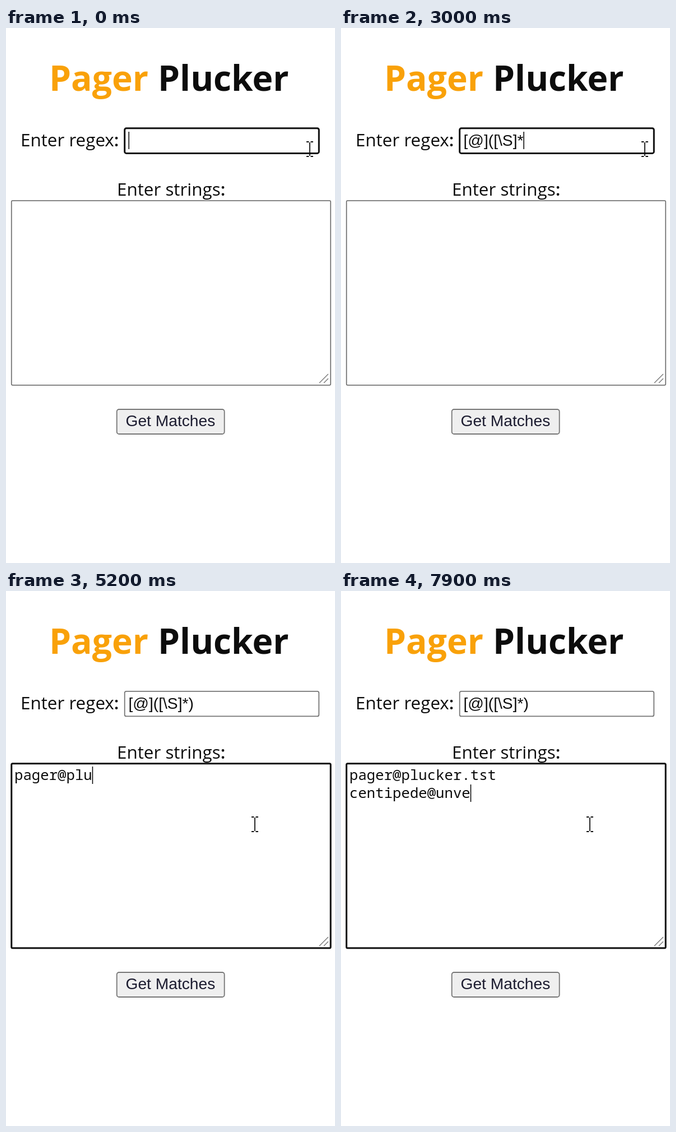
Recreate the animation shown at these times as an HTML page. Size 587x954 px, loop 8 s.

```html
<!DOCTYPE html>
<html lang="en">
<head>
<meta charset="utf-8">
<title>Pattern tester</title>
<style>
  html, body { margin: 0; width: 100%; height: 100%; overflow: hidden; background: #fff; }
  svg { display: block; width: 100%; height: 100%; }
  text { fill: #0c0c0c; }
  .title { font: 700 62.3px "Open Sans", sans-serif; }
  .title .accent { fill: #f9a109; }
  .label { font: 400 31.4px "Open Sans", sans-serif; }
  .label tspan { font-weight: 600; }
  .ui { font: 28.2px "Liberation Sans", Arial, sans-serif; }
  .button { fill: #1c1c30; }
  .mono { font: 25.7px "Noto Sans Mono", monospace; }
  .box { fill: #fff; stroke: #767676; stroke-width: 1.8; }
  .box.focus { stroke: #101010; stroke-width: 3; }
</style>
</head>
<body>
<svg viewBox="0 0 587 954">
  <g class="title">
    <text class="accent" x="77" y="112">Pager</text>
    <text x="271" y="112">Plucker</text>
  </g>
  <g class="label">
    <text x="26" y="211">Enter regex<tspan>:</tspan></text>
    <text x="198" y="299">Enter strings<tspan>:</tspan></text>
  </g>
  <rect id="field" class="box" x="211.7" y="178.8" width="346.6" height="44.6" rx="3"/>
  <rect id="area" class="box" x="9.8" y="307.8" width="569.4" height="329" rx="2"/>
  <path d="M559 633 575 617M567 633 575 625" stroke="#777" stroke-width="1.4"/>
  <rect x="197.7" y="680" width="192" height="44" rx="4" fill="#efefef" stroke="#767676" stroke-width="1.8"/>
  <text class="ui button" x="213.5" y="709.5">Get Matches</text>
  <text id="pattern" class="ui" x="218.5" y="210"/>
  <text id="line1" class="mono" x="15" y="337"/>
  <text id="line2" class="mono" x="15" y="369"/>
  <rect id="caret" width="1.5" height="31"/>
  <path id="mouse" fill="none" stroke="#111" stroke-width="1.8"
    d="M-6-13H-1.5M1.5-13H6M0-12V12M-6 13H-1.5M1.5 13H6"/>
</svg>
<script>
const LOOP = 8000, STEP = 100, BLINK = 500;
const $ = id => document.getElementById(id);

// Text is typed in bursts with an even gap between keys
const burst = (text, from, gap) => ({ text, from, gap });
const rows = [
  { id: "pattern", start: 0, caretTop: 185,
    bursts: [burst("[@]([\\S", 400, 250), burst("]*)", 2650, 250)] },
  { id: "line1", start: 3800, caretTop: 313,
    bursts: [burst("pager", 3950, 100), burst("@plucker.tst", 4800, 108)] },
  { id: "line2", start: 6250, caretTop: 345,
    bursts: [burst("centipede", 6450, 90), burst("@unve", 7400, 110)] }
];

function typed(row, t) {
  let text = "", last = row.start;
  for (const b of row.bursts) {
    if (t < b.from) break;
    const n = Math.min(b.text.length, Math.floor((t - b.from) / b.gap) + 1);
    text += b.text.slice(0, n);
    last = b.from + (n - 1) * b.gap;
  }
  return { text, last };
}

function ease(t, from, to) {
  const u = Math.min(1, Math.max(0, (t - from) / (to - from)));
  return u * u * (3 - 2 * u);
}

function drawCaret(row, t, last) {
  const el = $(row.id), caret = $("caret");
  const width = el.textContent ? el.getComputedTextLength() : 0;
  caret.setAttribute("x", el.x.baseVal[0].value + width);
  caret.setAttribute("y", row.caretTop);
  caret.style.opacity = (t - last) % (2 * BLINK) < BLINK ? 1 : 0;
}

function draw(t) {
  for (const row of rows) {
    const { text, last } = typed(row, t);
    $(row.id).textContent = text;
    if (t >= row.start) drawCaret(row, t, last);
  }
  const inArea = t >= rows[1].start;
  $("field").classList.toggle("focus", !inArea);
  $("area").classList.toggle("focus", inArea);

  // One sweep into the text area, then a short settle
  const sweep = ease(t, 3300, 3550), settle = ease(t, 3600, 3750);
  const x = 542 - 95 * sweep - 3 * settle;
  const y = 216 + 188 * sweep + 12 * settle;
  $("mouse").setAttribute("transform", `translate(${x} ${y})`);
}

const begin = performance.now();
function tick() {
  const t = (performance.now() - begin) % LOOP;
  draw(Math.floor(t / STEP) * STEP);
  requestAnimationFrame(tick);
}
tick();
</script>
</body>
</html>
```
